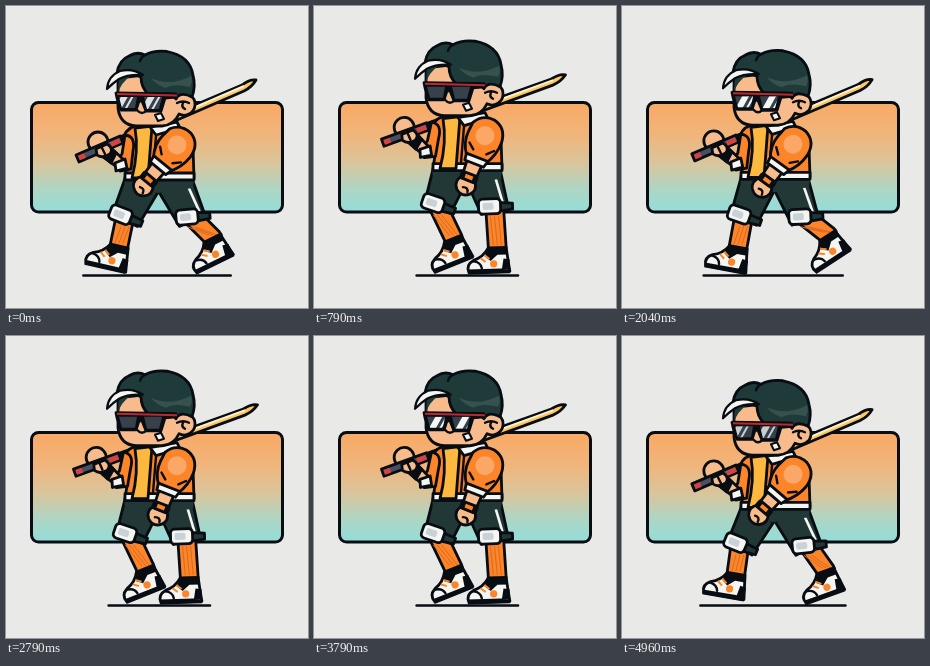
These frames come from a looping animation (302 by 302 pixels, 5 s). An HTML page:

```html
<!DOCTYPE html>
<html lang="en">
<head>
<meta charset="utf-8">
<title>Walking swordsman</title>
<style>
  html, body { margin: 0; width: 100%; height: 100%; overflow: hidden; background: #e9e9e7; }
  svg { display: block; width: 100vw; height: 100vh; }
  .o { stroke: #080c13; stroke-width: 2.8; stroke-linejoin: round; stroke-linecap: round; }
  .line { fill: none; stroke: #080c13; stroke-width: 2.4; stroke-linecap: round; stroke-linejoin: round; }
  .ink { fill: #080c13; } .skin { fill: #f8bc8c; } .orange { fill: #fb8528; }
  .white { fill: #f5f5f2; } .hair { fill: #1f3b39; } .pants { fill: #213836; }
  .limb { fill: none; stroke-linecap: round; stroke-linejoin: round; }
</style>
</head>
<body>
<svg viewBox="0 0 302 302">
  <defs>
    <linearGradient id="sky" x2="0" y2="1">
      <stop offset="0" stop-color="#f9a964"/><stop offset=".3" stop-color="#f0b57c"/>
      <stop offset=".55" stop-color="#dac59b"/><stop offset=".8" stop-color="#acd6c5"/>
      <stop offset="1" stop-color="#93ddd9"/>
    </linearGradient>
    <clipPath id="lenses"><path d="M113 91H131L129 102H116ZM138 91H156L153 103H141Z"/></clipPath>
    <g id="shoe">
      <path class="o white" d="M-9-2H9Q10 8 12 22H-29Q-32 14-24 10Q-14 7-9-2Z"/>
      <path class="ink" d="M-9-2H9L10 5H0L-7 11L-13 6ZM6 9L12 10V20H4ZM-30 19H12V24H-30Z"/>
      <path d="M-17 8L-12 12M-13 5L-8 9" stroke="#fb8528" stroke-width="2"/>
      <path class="line" d="M-24 11Q-17 12-16 18"/>
      <circle class="orange" cx="-4" cy="14" r="3.6"/>
    </g>
    <g id="knee">
      <path class="o" fill="#213836" d="M-8-5L18-3V3L-8 6Z"/>
      <rect class="o white" x="-16" y="-8" width="22" height="15" rx="4"/>
      <rect x="-12" y="-4" width="11" height="7" rx="2" fill="#c8d2d8"/>
    </g>
  </defs>

  <rect width="302" height="302" fill="#e9e9e7"/>
  <rect x="25.5" y="96.5" width="251" height="109.5" rx="7" fill="url(#sky)" stroke="#080c13" stroke-width="3"/>
  <path id="ground" class="line"/>

  <g id="sword">
    <path class="o" fill="#fcc763" d="M116 130L236 79Q244 73 250 74Q246 81 238 85L118 137Z"/>
    <path d="M118 132L238 80" stroke="#fff0cd" stroke-width="2"/>
  </g>
  <g id="farLeg"></g>
  <g id="nearLeg"></g>

  <g id="torso">
    <path class="pants" d="M118 170H188L187 182L152 187L119 182Z"/>
    <path class="o orange" d="M118 130Q122 120 134 119L168 120Q184 124 187 142L188 172H119L122 152Z"/>
    <path class="o white" d="M119 167H188V174H119Z"/>
    <path class="o" fill="#fcb83f" d="M129 122L146 120L142 172H126Q133 145 129 122Z"/>
    <path class="line" d="M150 130L147 166M152 152L156 160"/>
    <path class="o white" d="M144 121L171 116L174 122L150 129Z"/>
  </g>

  <g id="farArm">
    <circle class="o skin" cx="92" cy="136" r="10"/>
    <path class="o orange" d="M119 129Q130 130 127 145L125 163L114 165L110 156L116 148Z"/>
    <path class="o skin" d="M115 164L96 150L102 139L119 155Z"/>
    <path class="o white" d="M110 165L109 157L119 153L121 162Z"/>
    <path class="o ink" d="M105 157L110 147L105 143L99 152Z"/>
    <path class="o" fill="#475061" d="M70 149L114 130L117 137L73 156Z"/>
    <path d="M73 152L79 149.500M105 138.500L114 134.500" stroke="#d34440" stroke-width="5"/>
    <path class="o skin" d="M90 143L101 138Q108 142 104 148Q97 153 91 149Z"/>
    <path class="line" d="M96 142L99 148"/>
  </g>

  <g id="head">
    <path class="o skin" d="M112 72V102Q114 119 130 120H156Q168 119 173 108A11 11 0 1 0 174 88L164 66Z"/>
    <path class="hair" d="M112 88Q114 77 126 69L113 68Z"/>
    <path class="o hair" d="M111 67Q113 54 123 50Q131 45 139 49Q148 44 161 45.500Q184 50 187 69Q190 80 186 91Q174 85 170 93L165 88H142Q135 81 135 71Q124 66 111 67Z"/>
    <path d="M145 72Q164 81 185 70Q187 76 184 81Q167 77 160 82Q150 79 145 72Z" fill="#36514e"/>
    <path class="line" d="M139 49Q135 51 134 55"/>
    <path class="o white" d="M101 83Q102 70 114 65Q127 62 137 69Q122 68 113 73Q107 77 101 83Z" style="stroke-width:2.2"/>
    <path class="line" d="M171 97Q177 94 183 97M177 97Q175 101 179 103M131 104Q136 110 141 104"/>
    <path class="o white" d="M149 109L155 107L158 113L152 115Z" style="stroke-width:2"/>
    <path class="o ink" d="M110 87L170 88V91L159 92L155 105H140L136 95H133L130 104H115L111 92Z"/>
    <path d="M113 91H131L129 102H116ZM138 91H156L153 103H141Z" fill="#36414b"/>
    <g clip-path="url(#lenses)"><g id="glint" stroke="#f3f7f5">
      <path d="M123 88L113 106M150 88L140 106" stroke-width="6"/>
      <path d="M131 88L121 106M158 88L148 106" stroke-width="2"/>
    </g></g>
    <path d="M111 88L171 89.500" stroke="#b92a30" stroke-width="2"/>
  </g>

  <g id="arm">
    <path class="o skin" d="M-8 24H8L7 46Q13 54 7 60Q0 66-7 60Q-13 54-7 46Z"/>
    <rect class="o ink" x="-8" y="41" width="16" height="7" rx="2"/>
    <rect class="orange" x="-4" y="42.500" width="8" height="4"/>
    <path class="line" d="M-2 56Q3 54 4 59"/>
    <path class="o orange" d="M-16-8Q-10-19 3-18Q17-15 18 1Q18 14 11 25H-10Q-18 14-17 2Z"/>
    <path class="o white" d="M-11 23H12L10 30H-10Z"/>
    <path class="line" d="M-12 12L-6 17M14 11L8 17"/>
    <circle r="9.500" fill="#fba768"/>
  </g>
</svg>
<script>
const $ = id => document.getElementById(id);
const TAU = Math.PI * 2;
const LOOP = 5000, STEP = 5000 / 120, STRIDE = 1000;

// One stride: ankle x, ankle lift, shoe angle, knee x, knee y
const gait = [
  [-29, -2, 13, -23, 211], [-14, 0, 0, -12, 207], [4, 0, 0, 4, 200], [19, -2, -8, 9, 205],
  [33, -10, -26, 12, 211], [25, -16, -44, -1, 208], [6, -10, -30, -15, 199], [-19, -9, -4, -23, 203]
];
// Left and right end of the ground line
const groundEnds = [[77, 225], [93, 211], [110, 200], [112, 195], [112, 194], [112, 196], [109, 200], [92, 211]];

// Periodic Catmull-Rom through evenly spaced keys
function sample(keys, phase) {
  const n = keys.length, at = (((phase % 1) + 1) % 1) * n, i = Math.floor(at), u = at - i;
  const key = k => keys[(i + k + n) % n];
  return key(0).map((b, j) => {
    const a = key(-1)[j], c = key(1)[j], d = key(2)[j];
    return b + u * (c - a + u * (2 * a - 5 * b + 4 * c - d + u * (3 * (b - c) + d - a))) / 2;
  });
}

const limb = (d, width, color) =>
  `<path class="limb" d="${d}" stroke="${color}" stroke-width="${width}"/>`;
const outlined = (d, width, color) => limb(d, width + 5.6, '#080c13') + limb(d, width, color);

function leg(phase, center, hipX, hipY, stripe) {
  const [ax, lift, angle, kx, ky] = sample(gait, phase);
  const ankleX = center + ax, ankleY = 244 + lift, kneeX = center + kx;
  const shin = `M${kneeX} ${ky}L${ankleX} ${ankleY - 2}`;
  const ribs = [-4, 0, 4].map(o =>
    limb(`M${kneeX + o} ${ky + 10}L${ankleX + o} ${ankleY - 5}`, 1, '#d96a24')).join('');

  // Trouser leg: a quad across the thigh direction, narrowing to the knee
  const slope = Math.atan2(kneeX - hipX, ky - hipY);
  const cos = Math.cos(slope), sin = Math.sin(slope);
  const edge = (x, y, half) => `${x + half * cos} ${y - half * sin}`;
  const cuffY = ky + 3;
  const thigh = `M${edge(hipX, hipY, -18)}L${edge(kneeX, cuffY, -14)}L${edge(kneeX, cuffY, 14)}L${edge(hipX, hipY, 18)}Z`;

  return outlined(shin, 15, '#fb8528') + ribs +
    `<use href="#shoe" transform="translate(${ankleX} ${ankleY}) rotate(${angle})"/>` +
    `<path class="o pants" d="${thigh}"/>` +
    (stripe ? limb(`M${edge(hipX, hipY, 11)}L${edge(kneeX, cuffY - 3, 9)}`, 2.6, '#f5f5f2') : '') +
    `<use href="#knee" transform="translate(${kneeX} ${ky}) rotate(${slope * -28 + 8})"/>`;
}

function draw(time) {
  const phase = time / STRIDE % 1;
  const high = (1 - Math.cos(2 * TAU * phase)) / 2;
  const bob = -10 * high;
  const swing = Math.cos(TAU * (phase + .04));
  const move = (id, value) => $(id).setAttribute('transform', value);

  const [left, right] = sample(groundEnds, phase + .012);
  $('ground').setAttribute('d', `M${left} 269.5H${right}`);

  $('farLeg').innerHTML = leg(phase, 142, 136, 178 + bob, false);
  $('nearLeg').innerHTML = leg(phase + .5, 174, 169, 178 + bob, true);

  move('torso', `translate(0 ${bob})`);
  move('head', `translate(0 ${bob - high})`);
  const carry = `translate(0 ${bob}) rotate(${3.6 * high} 180 102)`;
  move('sword', carry);
  move('farArm', carry);
  move('arm', `translate(171 ${139 + bob}) rotate(${2.5 + 38 * swing})`);

  // The reflection crosses the lenses three times per loop
  const sweep = (time * 3 / LOOP + .12) % 1;
  move('glint', `translate(${-6 + 24 * sweep} 0)`);
  $('glint').setAttribute('opacity', sweep < .5 ? Math.min(1, .3 + sweep * 5) : 0);
}

const start = performance.now();
function tick() {
  const elapsed = Math.max(0, performance.now() - start) % LOOP;
  draw(Math.floor(elapsed / STEP + .1) * STEP);
  requestAnimationFrame(tick);
}
draw(0);
requestAnimationFrame(tick);
</script>
</body>
</html>
```
